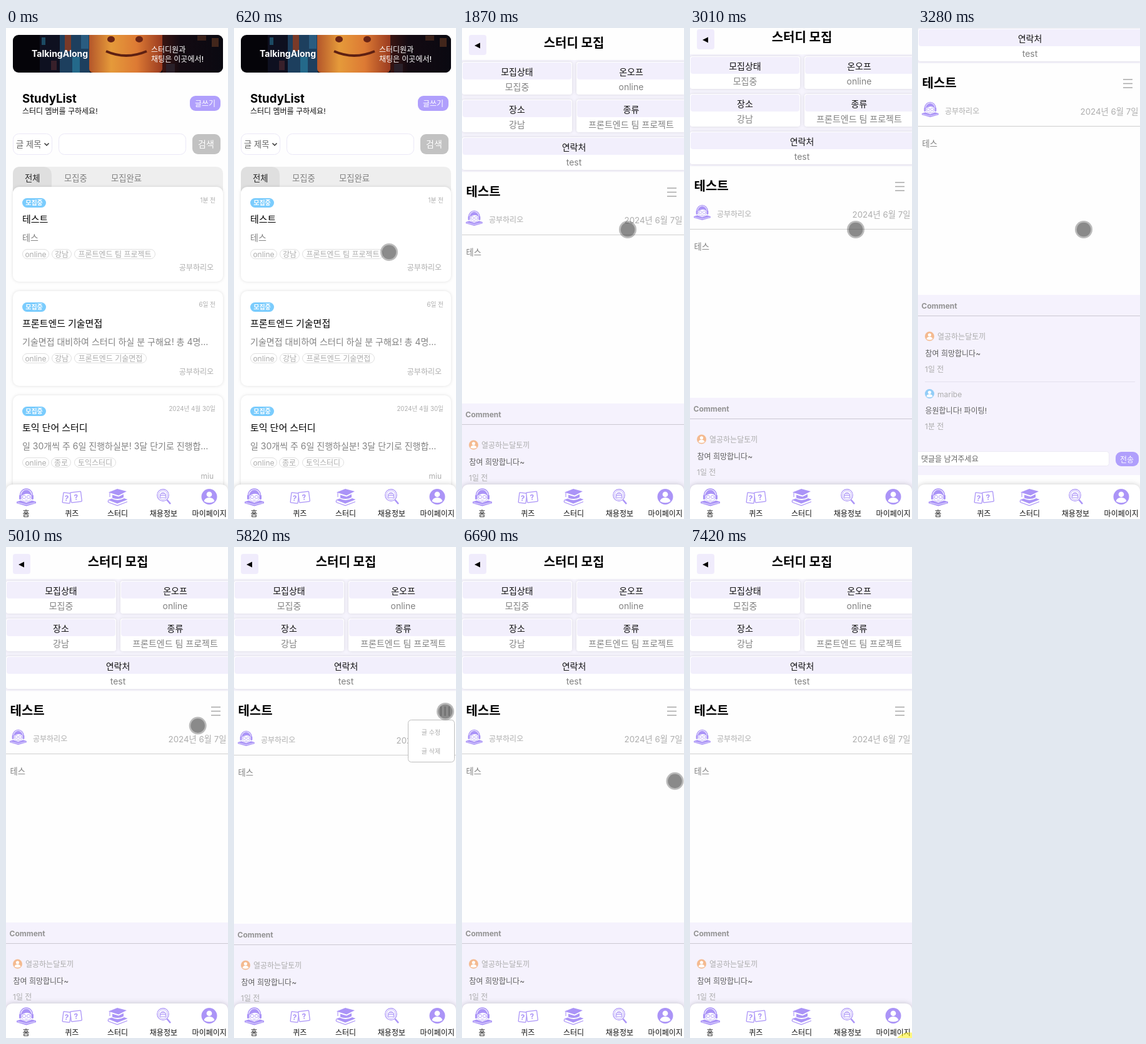
Animation, 355 px wide and 782 px high, one loop 7500 ms. Source, as an HTML page:

```html
<!DOCTYPE html>
<html lang="ko">
<head>
<meta charset="utf-8">
<title>스터디 모집</title>
<style>
  html, body { margin: 0; width: 100%; height: 100%; overflow: hidden; background: #fff; }
  svg { display: block; width: 100%; height: 100%; }
  text { font-family: Inter, 'Noto Sans CJK KR', 'Noto Sans CJK JP', 'Noto Sans CJK', sans-serif; }
  .soft { filter: drop-shadow(0 0 2.5px rgba(0, 0, 0, .12)); }
  .nav { filter: drop-shadow(0 0 4px rgba(0, 0, 0, .2)); }
</style>
</head>
<body>
<svg id="stage" viewBox="0 0 355 782"></svg>
<script>
const LOOP = 7500, STEP = 1000 / 15;
const PURPLE = '#ab94f7', BUTTON = '#b09ffc', GREY = '#adadad';

// y is the visual middle of the line
const text = (s, x, y, size, fill, anchor = 'start', weight = 400) =>
  `<text x="${x}" y="${y + size * .39}" font-size="${size}" fill="${fill}" text-anchor="${anchor}" font-weight="${weight}">${s}</text>`;
const mid = (s, x, y, size, fill, weight) => text(s, x, y, size, fill, 'middle', weight);
const end = (s, x, y, size, fill, weight) => text(s, x, y, size, fill, 'end', weight);
const box = (x, y, w, h, r, fill, more = '') =>
  `<rect x="${x}" y="${y}" width="${w}" height="${h}" rx="${r}" fill="${fill}" ${more}/>`;
const dot = (x, y, r, fill, more = '') => `<circle cx="${x}" cy="${y}" r="${r}" fill="${fill}" ${more}/>`;
const path = (d, fill, more = '') => `<path d="${d}" fill="${fill}" ${more}/>`;
const line = (d, stroke, w = 1) => path(d, 'none', `stroke="${stroke}" stroke-width="${w}"`);
const group = (body, transform = '', id = '') => `<g id="${id}" transform="${transform}">${body}</g>`;

function reader(x, y, scale) {
  return group(
    line('M-10 -3A10 10.5 0 0 1 10 -3', PURPLE, 1.4) +
    path('M-8.5 -2A8.5 10 0 0 1 8.5 -2L5 -5Q0 -7 -5 -4Z', PURPLE) +
    line('M-7.5 -2V2Q-6 6.5 0 6.5Q6 6.5 7.5 2V-2', PURPLE, .7) +
    box(-11.5, -4, 3.2, 7.5, 1.6, PURPLE) + box(8.3, -4, 3.2, 7.5, 1.6, PURPLE) +
    dot(-3.5, -.5, 2.6, '#fff', `stroke="${PURPLE}" stroke-width=".8"`) +
    dot(3.5, -.5, 2.6, '#fff', `stroke="${PURPLE}" stroke-width=".8"`) +
    line('M-2 4Q0 5 2 4', PURPLE, .7) +
    path('M-15.5 7L-9 5L0 8.5L9 5L15.5 7V9.5L0 14L-15.5 9.5Z', PURPLE) +
    line('M-14 8.5L0 11.5L14 8.5', '#fff', .7),
    `translate(${x} ${y}) scale(${scale})`);
}

function person(x, y, r, fill) {
  return group(dot(0, 0, 10, fill) + dot(0, -3, 3.5, '#fff') +
    path('M-6.5 6A6.5 5 0 0 1 6.5 6Q0 9.5 -6.5 6Z', '#fff'),
    `translate(${x} ${y}) scale(${r / 10})`);
}

function banner() {
  const spark = (x, y, w, h, c) => box(x, y, w, h, 0, c);
  const eye = x => `<ellipse cx="${x}" cy="18" rx="6" ry="5" fill="#6a2415"/>`;
  return `<clipPath id="frame">${box(11, 11, 336, 60, 9, '#000')}</clipPath>
    <linearGradient id="skin"><stop offset="0" stop-color="#b4562a"/><stop offset=".3" stop-color="#e59a3a"/>
    <stop offset=".65" stop-color="#dd7a34"/><stop offset="1" stop-color="#9a3b20"/></linearGradient>
    <linearGradient id="night"><stop offset="0" stop-color="#3a1512"/><stop offset=".3" stop-color="#130a12"/>
    <stop offset="1" stop-color="#0a0911"/></linearGradient>
    <g clip-path="url(#frame)">` +
    box(11, 11, 336, 60, 0, '#050409') +
    spark(54, 11, 32, 60, '#0e1020') + spark(86, 11, 48, 60, '#1d3f5e') +
    spark(57, 15, 6, 12, '#1c4a63') + spark(72, 52, 9, 15, '#38202a') +
    spark(94, 11, 10, 26, '#7a3a28') + spark(106, 46, 12, 25, '#24698a') + spark(120, 11, 12, 22, '#2a5c80') +
    box(133, -20, 117, 91, 6, 'url(#skin)') + eye(168) + eye(213) +
    line('M160 37Q192 51 225 37', '#5e2012', 4) +
    spark(250, 11, 97, 60, 'url(#night)') + spark(256, 57, 14, 14, '#2a2029') +
    spark(306, 12, 14, 8, '#3a2019') + spark(329, 16, 11, 14, '#42261b') +
    '</g>' +
    text('TalkingAlong', 41, 41, 14, '#fff', 'start', 700) +
    text('스터디원과', 232, 34, 12, '#fff', 'start', 500) +
    text('채팅은 이곳에서!', 232, 49, 12, '#fff', 'start', 500);
}

function card(y, when, title, body, tags, author) {
  const pill = ([s, x, w]) =>
    box(x + .5, 99.5, w - 1, 15, 7.5, '#fff', 'stroke="#e0e0e0"') + mid(s, x + w / 2, 107, 12, GREY);
  return group(
    box(11, 0, 336, 151, 10, '#fff', 'class="soft"') +
    box(26, 18, 38, 15, 7.5, '#7accfd') + mid('모집중', 45, 25.5, 10, '#fff', 700) +
    end(when, 335, 21, 9.7, GREY) +
    text(title, 26, 51, 15, '#000', 'start', 500) +
    text(body, 26, 80.5, 14, '#828282') +
    tags.map(pill).join('') + end(author, 332, 128, 12, GREY),
    `translate(0 ${y})`);
}

function listPage() {
  const edge = 'stroke="#ebe8f7"';
  return banner() +
    text('StudyList', 26, 112, 18.7, '#000', 'start', 700) +
    text('스터디 멤버를 구하세요!', 26, 132, 12, '#111') +
    box(294, 108, 49, 24, 9, BUTTON) + mid('글쓰기', 318.5, 120, 12, '#fff', 500) +
    box(11.5, 168.5, 62, 33, 9, '#fff', edge) + text('글 제목', 16, 185, 13.3, '#666') +
    line('M61.5 183.5L65 187L68.5 183.5', '#333', 1.5) +
    box(84.5, 168.5, 203, 33, 9, '#fff', edge) +
    box(298, 169, 45, 32, 9, '#c2c2c2') + mid('검색', 320, 185, 14, '#fff', 500) +
    path('M11 260V233Q11 221 23 221H335Q347 221 347 233V260Z', '#eee') +
    path('M11 260V233Q11 221 23 221H59Q73 221 73 235V260Z', '#dfdfdf') +
    text('전체', 30, 239, 13.3, '#222') + text('모집중', 93, 239, 13.3, '#808080') +
    text('모집완료', 168, 239, 13.3, '#808080') +
    card(253, '1분 전', '테스트', '테스',
      [['online', 26, 43], ['강남', 73, 32], ['프론트엔드 팀 프로젝트', 109, 130]], '공부하리오') +
    card(419, '6일 전', '프론트엔드 기술면접', '기술면접 대비하여 스터디 하실 분 구해요! 총 4명…',
      [['online', 26, 43], ['강남', 73, 32], ['프론트엔드 기술면접', 109, 116]], '공부하리오') +
    card(585, '2024년 4월 30일', '토익 단어 스터디', '일 30개씩 주 6일 진행하실분! 3달 단기로 진행합…',
      [['online', 26, 43], ['종로', 72, 32], ['토익스터디', 109, 67]], 'miu');
}

function info(x, y, w, label, value) {
  return box(x, y, w, 52, 4, '#fff', 'class="soft"') + box(x + 1, y + 1, w - 2, 27, 4, '#f2effc') +
    mid(label, x + w / 2, y + 15.3, 14, '#111') + mid(value, x + w / 2, y + 39.5, 14, '#828282');
}

function comment(y, colour, name, body, when) {
  return person(18.5, y, 7.5, colour) + text(name, 31, y + .5, 12, GREY) +
    text(body, 11.5, y + 27, 12, '#606060') + text(when, 11, y + 52, 12, GREY);
}

function detailPage() {
  const head =
    box(11, 11, 28, 32, 4, '#f0ecfc') + path('M20 28L29 23.5V32.5Z', '#000') +
    mid('스터디 모집', 179, 23, 20, '#000', 700) +
    box(0, 51, 355, 178, 0, '#f6f4fd') +
    info(0, 54, 176, '모집상태', '모집중') + info(183, 54, 175, '온오프', 'online') +
    info(0, 114, 176, '장소', '강남') + info(183, 114, 175, '종류', '프론트엔드 팀 프로젝트') +
    info(0, 174, 358, '연락처', 'test') +
    text('테스트', 6.5, 260, 20, '#000', 'start', 700) +
    group(line('M-7.5 -6.5H7.5M-7.5 0H7.5M-7.5 6.5H7.5', '#a8a8a8', 1.7), '', 'burger');
  const post =
    reader(19.5, 303, .86) + text('공부하리오', 43, 305.5, 12, GREY) +
    end('2024년 6월 7일', 352.5, 306, 13.3, GREY) +
    line('M0 329.5H355', '#cfcfcf') + text('테스', 6.5, 357, 13.3, '#828282') +
    box(0, 598, 355, 287, 0, '#f5f2fd') +
    text('Comment', 5.5, 615, 12, '#939393', 'start', 700) + line('M0 631.5H355', '#cbc8d2') +
    comment(664, '#f4ba90', '열공하는달토끼', '참여 희망합니다~', '1일 전') +
    line('M11 736.5H347', '#e4e0ee') +
    comment(755.5, '#93cdf7', 'maribe', '응원합니다! 파이팅!', '1분 전') +
    box(-3.5, 847.5, 309, 23, 4, '#fff', 'stroke="#ece9f4"') + text('댓글을 남겨주세요', 5, 859, 12, '#666') +
    box(316, 848, 37, 23, 9, BUTTON) + mid('전송', 334, 860, 12, '#fff', 500);
  const menu = box(278.5, 275.5, 74, 67, 5, '#fff', 'stroke="#bdbdbd"') +
    mid('글 수정', 315, 295, 10, GREY) + mid('글 삭제', 315, 325, 10, GREY);
  return head + group(post, '', 'post') + group(menu, '', 'menu');
}

function navBar() {
  const quizCard = (x, y, turn, w) => group(
    box(-w / 2, -8, w, 16, 1, '#fff', `stroke="${PURPLE}" stroke-width="1.3"`) + mid('?', 0, 0, 12, PURPLE, 700),
    `translate(${x} ${y}) rotate(${turn})`);
  const cap =
    path('M164 739.5L178 734L193 738L180 744.5Z', PURPLE) +
    path('M170 743.5L180 746.5L188 742.5V747.5Q180 752 170 748.5Z', PURPLE) +
    line('M166 740V747', PURPLE, 1.1) +
    path('M163 751.5L169 749.5Q179 754.5 189 749L194.5 751L178 757.5Z', PURPLE) +
    line('M164 752Q162.5 754 164 755.5L178 760.5L194 754.5', PURPLE, 1.2);
  const search =
    dot(251, 744, 9.3, '#fff', `stroke="${PURPLE}" stroke-width="1.2"`) +
    dot(251, 744, 7.2, 'none', `stroke="${PURPLE}" stroke-width=".7"`) +
    box(246.5, 742, 9, 6, 1, 'none', `stroke="${PURPLE}" stroke-width="1.1"`) +
    line('M249 742V740H253V742M246.5 744.5H255.5', PURPLE, 1) + line('M257.5 751.5L263 758', PURPLE, 2.6);
  const labels = ['홈', '퀴즈', '스터디', '채용정보', '마이페이지'];
  return path('M0 790V739Q0 727 12 727H343Q355 727 355 739V790Z', '#fff', 'class="nav"') +
    reader(32.5, 747.5, 1) + quizCard(97, 748.5, 7, 12) + quizCard(112, 747, -7, 17) +
    cap + search + person(325, 746.5, 12.5, PURPLE) +
    labels.map((s, i) => mid(s, 32 + i * 73.3, 773, 12, '#111')).join('');
}

const stage = document.getElementById('stage');
stage.innerHTML = box(0, 0, 355, 782, 0, '#fefefe') +
  group(listPage(), '', 'list') + group(detailPage(), '', 'detail') + navBar() +
  group(dot(0, 0, 14, '#404040', 'opacity=".35"') + dot(0, 0, 11.3, '#404040', 'opacity=".4"'), '', 'cursor') +
  dot(350, 797, 24, '#fff000', 'opacity=".5" id="halo"');

const part = {};
for (const id of ['list', 'detail', 'burger', 'post', 'menu', 'cursor', 'halo']) part[id] = document.getElementById(id);
const show = (el, on) => el.setAttribute('display', on ? 'inline' : 'none');
const move = (el, value) => el.setAttribute('transform', value);

const between = (t, a, b) => t >= a && t < b;
const ramp = (t, a, b) => Math.min(1, Math.max(0, (t - a) / (b - a)));
const inOut = u => u < .5 ? 2 * u * u : 1 - 2 * (1 - u) ** 2;
const out = u => 1 - (1 - u) ** 2;

// [from, to, x, y, easing]
const START = [332, 747];
const moves = [
  [200, 600, 248, 357, out], [600, 933, 265, 321, inOut],
  [4600, 5333, 336, 259, inOut], [5400, 5600, 336, 267, inOut], [5600, 5800, 338, 262, inOut],
  [6400, 7230, 350, 799, inOut]
];

function cursorAt(t) {
  let [x, y] = START;
  for (const [a, b, tx, ty, ease] of moves) {
    const u = ease(ramp(t, a, b));
    x += (tx - x) * u;
    y += (ty - y) * u;
  }
  return [x, y];
}

function draw(time) {
  const t = Math.floor((time + 2) / STEP) * STEP + .01;
  const [x, y] = cursorAt(t);
  const hover = t > 1800 && Math.hypot(x - 336, y - 261) < 10;
  const pressed = between(t, 1600, 1866) || between(t, 6266, 6466);
  const scroll = 173 * (inOut(ramp(t, 2950, 3266)) - inOut(ramp(t, 4066, 4330)));

  show(part.list, t < 1800);
  show(part.detail, t >= 1800);
  move(part.detail, `translate(0 ${-Math.round(scroll)})`);
  move(part.burger, `translate(${hover ? 337.5 : 335.5} 261.5) rotate(${hover ? 90 : 0})`);
  move(part.post, `translate(0 ${hover ? 2 : 0})`);
  show(part.menu, hover);
  show(part.cursor, between(t, 200, 7200));
  move(part.cursor, `translate(${x} ${y}) scale(${pressed ? 1.07 : 1})`);
  show(part.halo, t >= 7400);
}

const begin = performance.now();
function tick() {
  draw((performance.now() - begin) % LOOP);
  requestAnimationFrame(tick);
}
tick();
</script>
</body>
</html>
```
